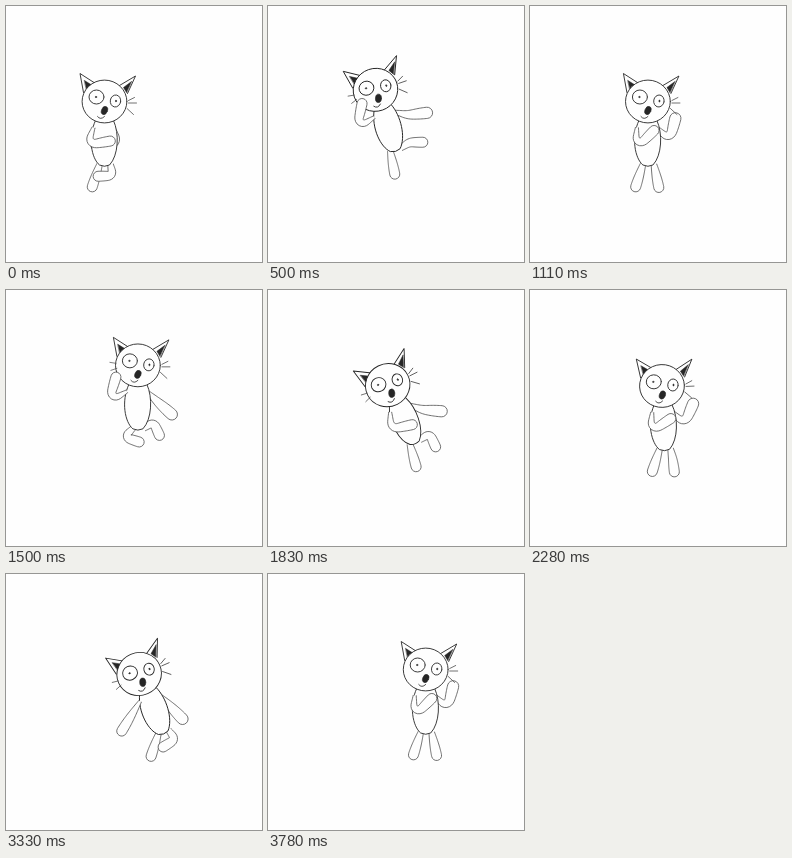
An HTML page with a canvas that plays this animation: 256x256 px, repeating every 3.84 s.

```html
<!DOCTYPE html>
<html lang="en">
<head>
<meta charset="utf-8">
<title>Dancing cat</title>
<style>
  html, body { margin: 0; width: 100%; height: 100%; overflow: hidden; background: #fefefe; }
  canvas { display: block; width: 100vw; height: 100vh; }
</style>
</head>
<body>
<canvas id="stage"></canvas>
<script>
const LOOP = 3840, FPS = 18, LAST = 68;
const CYCLE = LAST / 3, STRIDE = 19.6;
const PAPER = '#fefefe', INK = '#262626', SOFT = '#4c4c4c';
const RAD = Math.PI / 180;

const canvas = document.getElementById('stage');
const ctx = canvas.getContext('2d');
const dpr = window.devicePixelRatio || 1;
canvas.width = canvas.height = Math.round(256 * dpr);

const clamp = v => Math.min(1, Math.max(0, v));

// Smooth rise from 0 to 1 between two moments
function ramp(k, from, to) {
  const u = clamp((k - from) / (to - from));
  return u * u * (3 - 2 * u);
}

// Smooth swell to 1 at a moment and back to 0
const bump = (k, at, width) => Math.cos(Math.PI / 2 * clamp(Math.abs(k - at) / width)) ** 2;

// One dance cycle: hop, lean back with a kick, swing upright
function poseAt(k) {
  const hop = Math.sin(Math.PI * clamp((k - 1.5) / 9.5));
  const lean = bump(k, 12.2, 7.5);
  const open = bump(k, 0, 4);
  const raise = ramp(k, 2.5, 4.5) - ramp(k, 9, 10.3);
  const kick = ramp(k, 0, 4) - ramp(k, 10.5, 16.5);
  const settle = ramp(k, 15, 19);
  return {
    x: 98.5 + 20 * ramp(k, 1.5, 6) - 27 * bump(k, 13.2, 7.5),
    y: 95.5 - 25 * hop + 6 * lean,
    turn: -31 * lean,
    leftArm: {
      angle: 110 + 62 * bump(k, 2.3, 2.3) + 38 * raise - 34 * bump(k, 10.3, 1.5)
        + 65 * bump(k, 12.5, 3) - 15 * settle,
      bend: -120 * bump(k, 0, 2.3) + 140 * raise - 100 * bump(k, 10.3, 1.5) - 140 * settle
    },
    rightArm: {
      angle: 46 + 29 * open - 33 * bump(k, 8.7, 5),
      bend: 100 * open - 20 * bump(k, 8.7, 6) - 122 * settle
    },
    leftLeg: {
      angle: 108 + 27 * bump(k, 4.7, 3.3) - 34 * bump(k, 10, 4),
      bend: -120 * bump(k, 4.7, 3.3)
    },
    rightLeg: {
      angle: 78 - 112 * kick,
      bend: 100 * (1 - ramp(k, 14, 19)) - 75 * bump(k, 8.6, 1.8)
    }
  };
}

function ink(path, width = 0.9, color = INK, fill = PAPER) {
  if (fill) {
    ctx.fillStyle = fill;
    ctx.fill(path);
  }
  ctx.lineWidth = width;
  ctx.strokeStyle = color;
  ctx.stroke(path);
}

const svg = (d, ...style) => ink(new Path2D(d), ...style);

function oval(x, y, rx, ry, turn, ...style) {
  const p = new Path2D();
  p.ellipse(x, y, rx, ry, turn * RAD, 0, Math.PI * 2);
  ink(p, ...style);
}

function place([x, y], turn, draw) {
  ctx.save();
  ctx.translate(x, y);
  ctx.rotate(turn * RAD);
  draw();
  ctx.restore();
}

// Maps a point of a turned part to the stage
function joint([ox, oy], turn, x, y) {
  const c = Math.cos(turn * RAD), s = Math.sin(turn * RAD);
  return [ox + x * c - y * s, oy + x * s + y * c];
}

// A soft tube that bends at the joint and widens to a round end
function limb([x, y], length, { angle, bend }, r0, r1) {
  const n = 24, left = [], right = [];
  let dir = 0;
  for (let i = 0; i <= n; i++) {
    const s = i / n;
    dir = (angle + bend * ramp(s, 0.2, 0.62)) * RAD;
    const r = r0 + (r1 - r0) * Math.sin(s * Math.PI / 2);
    const dx = Math.cos(dir), dy = Math.sin(dir);
    left.push([x + dy * r, y - dx * r]);
    right.unshift([x - dy * r, y + dx * r]);
    if (i < n) {
      x += dx * length / n;
      y += dy * length / n;
    }
  }
  const p = new Path2D();
  left.forEach(q => p.lineTo(...q));
  p.arc(x, y, r1, dir - Math.PI / 2, dir + Math.PI / 2);
  right.forEach(q => p.lineTo(...q));
  ink(p, 0.8, SOFT);
}

function drawBody() {
  svg('M-9 -23C-17 -6 -13 15 -5 21.5Q0 24 5 21.5C14 12 15 -10 9 -23');
}

function drawHead(air) {
  svg('M-21 -9L-24.5 -28L-9 -18');
  svg('M-20 -21L-12 -16L-18 -12Z', 0.5, INK, INK);
  svg('M15 -16L31 -25.5L23 -8');
  svg('M27 -20L19 -14L22 -9Z', 0.5, INK, INK);
  oval(0, 0, 22.4, 21.4, 0);
  oval(-8, -4.5, 7.5, 7, 0);
  oval(11, -0.5, 5.2, 6, 10);
  oval(-8.5, -4.5, 0.8, 0.7, 0, 0.5, INK, INK);
  oval(11.5, -0.5, 0.6, 1, 0, 0.5, INK, INK);
  oval(0, 9, 3, 4.2, 22, 0.6, INK, INK);
  svg('M-7 15Q-4 19 0 15', 0.8, INK, null);
  svg('M24 1.5L32 1.5M24 -1L30 -4M22.5 7L29 13', 0.8, SOFT, null);
  if (air) svg('M-28 -3L-22 -2M-27 5L-21 3', 0.7, SOFT, null);
}

function draw(time) {
  const step = Math.min(LAST, Math.floor((time % LOOP) * FPS / 1000 + 0.08));
  const cycle = Math.min(2, Math.floor(step / CYCLE));
  const k = step - cycle * CYCLE;
  const pose = poseAt(k);
  const head = [pose.x, pose.y];
  const body = joint(head, pose.turn, 0, 42);
  const tilt = pose.turn * 0.85;
  const at = (x, y) => joint(body, tilt, x, y);

  ctx.setTransform(dpr, 0, 0, dpr, 0, 0);
  ctx.fillStyle = PAPER;
  ctx.fillRect(0, 0, 256, 256);
  ctx.translate(cycle * STRIDE, 0);
  ctx.lineJoin = ctx.lineCap = 'round';

  limb(at(9, -16), 34, pose.rightArm, 1.5, 5.6);
  limb(at(-5, 21), 23.5, pose.leftLeg, 2.8, 5);
  limb(at(6, 21), 23.5, pose.rightLeg, 2.8, 5);
  place(body, tilt, drawBody);
  place(head, pose.turn, () => drawHead(k > 3 && k < 16));
  limb(at(-11, -16), 35, pose.leftArm, 1.5, 5);
}

const start = performance.now();
function tick() {
  draw(performance.now() - start);
  requestAnimationFrame(tick);
}
tick();
</script>
</body>
</html>
```
